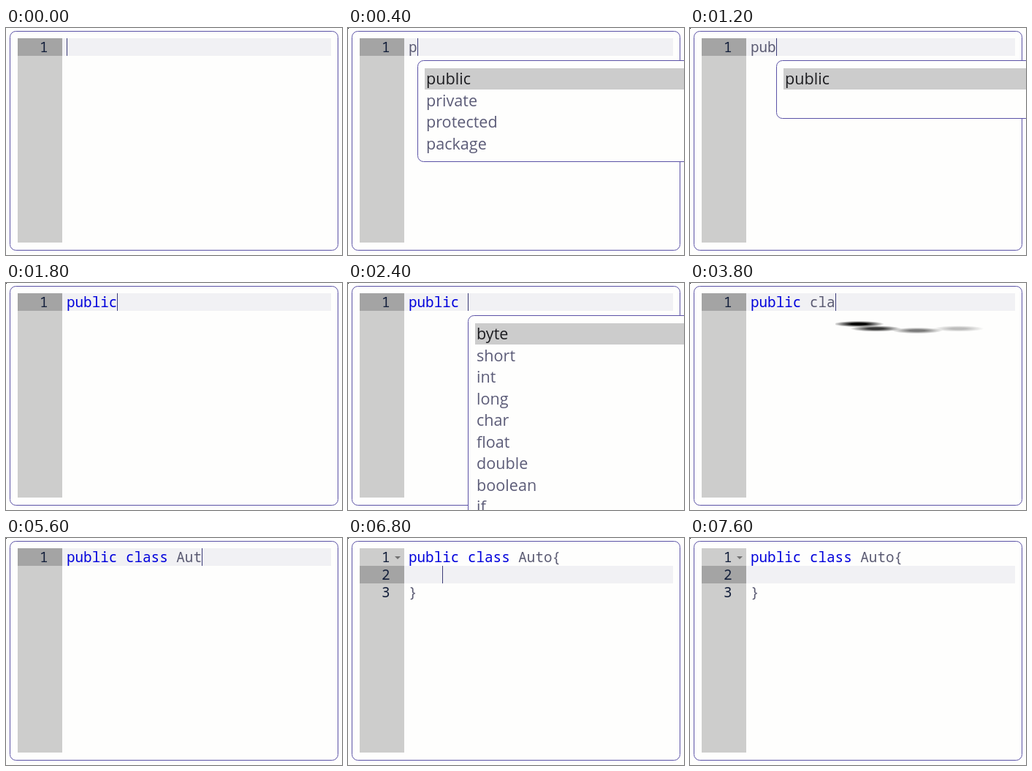
An HTML page for the animation above (8000 ms loop, 460 px wide and 310 px high).

```html
<!DOCTYPE html>
<html lang="en">
<head>
<meta charset="utf-8">
<title>Code completion</title>
<style>
  html, body { margin: 0; width: 100%; height: 100%; overflow: hidden; background: #fefefd; }
  svg { display: block; width: 460px; height: 310px; }
  text { white-space: pre; }
  .code { font: 19.27px "Noto Sans Mono", monospace; fill: #5a5a72; }
  .code .keyword { fill: #0000dc; }
  .number { font: 19.27px "Noto Sans Mono", monospace; fill: #14203c; }
  .item { font: 21.6px "Open Sans", sans-serif; fill: #5c5c78; }
  .item.selected { fill: #1c1c20; }
  .frame { fill: #fefefd; stroke: #5b52a6; }
</style>
</head>
<body>
<svg id="stage" viewBox="0 0 460 310"></svg>
<script>
const LOOP = 8000;
const CHAR = 11.56, LEFT = 83, LINE = 24, ROW = 29.5;
const KEYWORDS = ("byte short int long char float double boolean if else switch case while do for " +
  "try catch public private protected package class const continue").split(" ");

// [start ms, code, popup: "list" | "load" | "", cursor visible]
const STEPS = [
  [0, "", "", 1],
  [200, "p", "load", 1],
  [400, "p", "list", 1],
  [600, "pu", "load", 1],
  [800, "pu", "list", 1],
  [1000, "pub", "load", 1],
  [1200, "pub", "list", 1],
  [1600, "public", "", 1],
  [2000, "public ", "load", 1],
  [2400, "public ", "list", 1],
  [2600, "public c", "list", 1],
  [3400, "public cl", "list", 1],
  [3600, "public cla", "load", 1],
  [4000, "public cla", "list", 1],
  [4200, "public class", "", 1],
  [4600, "public class", "", 0],
  [4800, "public class ", "", 1],
  [5200, "public class A", "", 1],
  [5600, "public class Aut", "", 1],
  [5800, "public class Auto", "", 1],
  [6200, "public class Auto{}", "", 1],
  [6600, "public class Auto{\n    \n}", "", 1],
  [7000, "public class Auto{\n    \n}", "", 0],
  [7200, "public class Auto{\n    \n}", "", 1],
  [7600, "public class Auto{\n    \n}", "", 0]
];

const stage = document.getElementById("stage");

const rect = (x, y, w, h, fill) =>
  `<rect x="${x}" y="${y}" width="${w}" height="${h}" fill="${fill}"/>`;
const text = (x, y, cls, content) => `<text x="${x}" y="${y}" class="${cls}">${content}</text>`;
const box = (x, y, w, h) =>
  `<rect class="frame" x="${x + .5}" y="${y + .5}" width="${w - 1}" height="${h - 1}" rx="8"/>`;
const highlight = line =>
  line.replace(/\b(public|class)\b/g, '<tspan class="keyword">$1</tspan>');

function editor(lines, active) {
  const top = 14 + active * LINE;
  let out = box(5, 4, 450, 300) + rect(16, 14, 61, 279, "#cdcdcc") +
    rect(16, top, 61, LINE, "#a4a4a4") + rect(77, top, 368, LINE, "#f1f1f4");
  lines.forEach((line, i) => {
    const base = 33 + i * LINE;
    out += text(46, base, "number", i + 1) + text(LEFT, base, "code", highlight(line));
  });
  if (lines.length > 1) out += '<path d="M64 25h8l-4 4z" fill="#707070"/>';
  return out;
}

function list(x, prefix) {
  const items = KEYWORDS.filter(word => word.startsWith(prefix));
  let out = box(x, 44, 500, Math.max(80, 21 + items.length * ROW)) +
    rect(x + 10, 55, 480, 29, "#cccccc");
  items.forEach((word, i) => {
    out += text(x + 12, 77.3 + i * ROW, i ? "item" : "item selected", word);
  });
  return out;
}

// A ring of fading dots, flattened into a wide strip
function spinner(x, step) {
  let out = `<defs><radialGradient id="dot"><stop offset=".3"/>
    <stop offset="1" stop-opacity="0"/></radialGradient>
    <clipPath id="strip"><rect x="${x}" y="44" width="226" height="26"/></clipPath></defs>
    <g clip-path="url(#strip)" fill="url(#dot)">`;
  [1, .78, .52, .26].forEach((opacity, i) => {
    const angle = (step - i) * Math.PI / 4;
    out += `<ellipse cx="${x + 112 + 80 * Math.cos(angle)}" cy="${56 + 9 * Math.sin(angle)}"
      rx="35" ry="4.2" opacity="${opacity}"/>`;
  });
  return out + "</g>";
}

function render(t) {
  const [start, code, popup, cursor] = STEPS.findLast(step => step[0] <= t);
  const lines = code.split("\n");
  const active = lines.length > 1 ? 1 : 0;
  const column = lines[active].replace(/}$/, "").length;
  const x = Math.round(LEFT + column * CHAR);
  let out = editor(lines, active);
  if (cursor) out += rect(x, 14 + active * LINE, 1, LINE, "#3c3c78");
  if (popup === "list") out += list(x, code.split(" ").pop());
  if (popup === "load") out += spinner(x, 3 + Math.floor((t - start) / 200));
  if (t >= 200) out += rect(0, 0, 1, 1, "#000");
  return out;
}

let shown = "";
function tick() {
  const picture = render(performance.now() % LOOP);
  if (picture !== shown) stage.innerHTML = shown = picture;
  requestAnimationFrame(tick);
}
tick();
</script>
</body>
</html>
```
